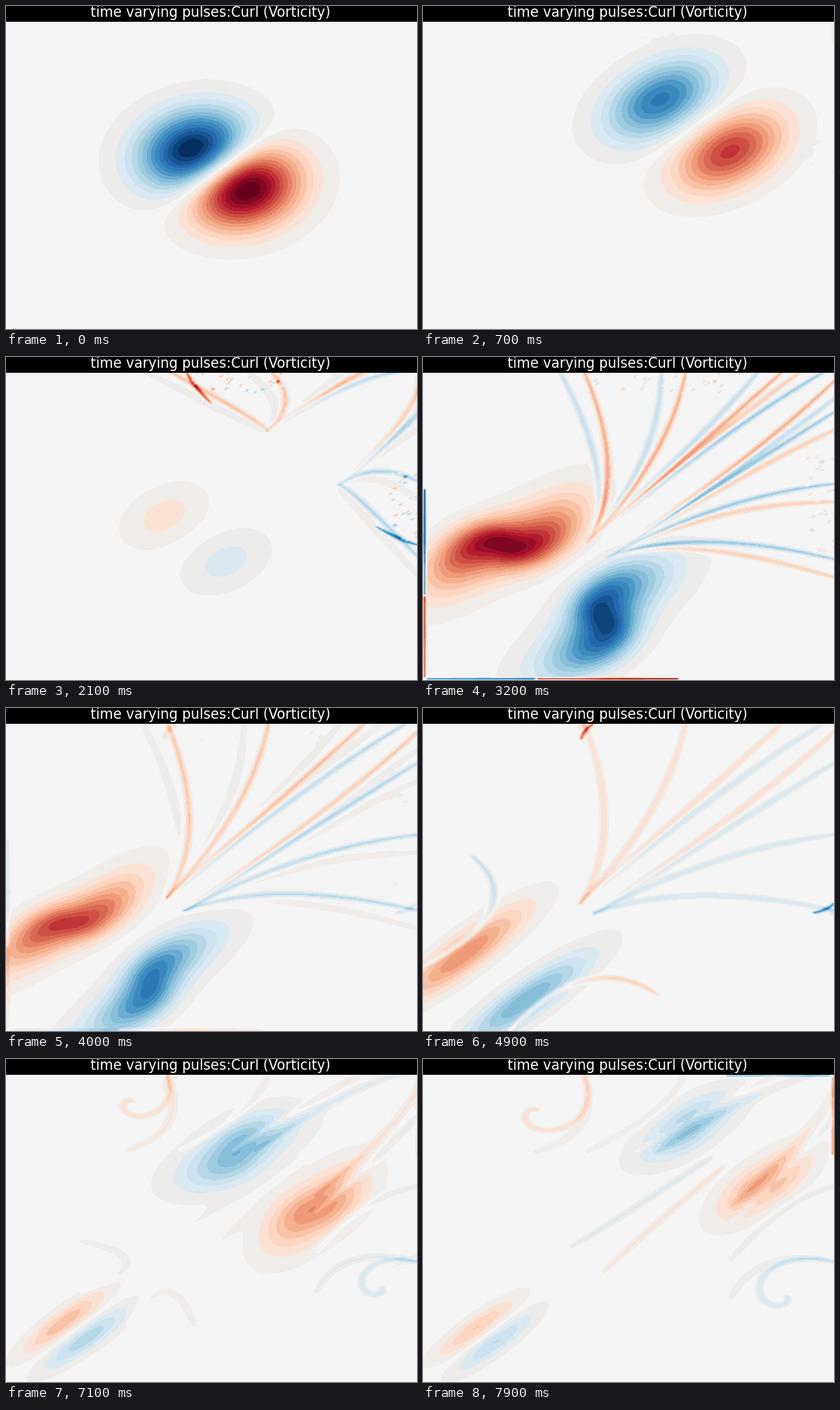
A matplotlib script that plays this animation: 496 px wide and 389 px high, repeating every 8 s.

```python
import numpy as np
import matplotlib.pyplot as plt
from matplotlib.animation import FuncAnimation

W, H, BAR = 496, 389, 19
FRAMES, STEP = 80, 100
BANDS = 14                       # colour bands on each side of zero
n = 248                          # grid of the unit square, b pointing up
axis = np.linspace(0, 1, n)
A, B = np.meshgrid(axis, axis)
rng = np.random.default_rng(4)
seeds = rng.uniform(-1, 1, (26, 2))


def hat(p):
    """Matrix of linear interpolation from the grid to positions p."""
    return np.maximum(0, 1 - np.abs(p[:, None] * (n - 1) - np.arange(n)))


COLS = hat((np.arange(W) + .5) / W)
ROWS = hat(1 - (np.arange(H - BAR) + .5) / (H - BAR))


def track(t, keys):
    """Row of values at time t; the first column of keys is time."""
    k = np.array(keys, float)
    return np.array([np.interp(t, k[:, 0], c) for c in k.T[1:]])


def bump(t, mid, width):
    return np.exp(-((t - mid) / width)**2)


# Vortices above the diagonal: time, strength, centre, length, width, tilt, swirl
FIRST = [(0, -17, .465, .573, .135, .12, .785, 0),
         (1.4, -2.7, .69, .92, .16, .07, .785, 0),
         (1.9, 0, .78, 1, .16, .06, .785, 0)]
BACK = [(1.8, 0, .40, .54, .10, .07, .8, 0),
        (2.1, 2, .385, .535, .11, .075, .8, 0),
        (3.2, 13.5, .20, .44, .19, .085, .85, 1.4),
        (4.9, 6.5, .10, .25, .2, .05, .8, 0),
        (6.4, 4.8, .15, .21, .14, .036, .82, 0),
        (7.9, 3.6, .13, .175, .13, .032, .78, 0)]
SECOND = [(5, 0, .465, .573, .135, .11, .785, 0),
          (6.4, -8, .49, .685, .165, .085, .45, -.8),
          (7.9, -5, .645, .83, .14, .06, .7, -.2)]


def vortex(t, keys):
    """Gaussian ellipse whose core is wound up relative to its rim."""
    amp, a, b, length, width, tilt, swirl = track(t, keys)
    if not amp:
        return 0
    x, y = A - a, B - b
    turn = tilt - swirl * np.exp(-np.hypot(x, y) / .12)
    c, s = np.cos(turn), np.sin(turn)
    return amp * np.exp(-((x * c + y * s) / length)**2 - ((y * c - x * s) / width)**2)


def ribbon(u, amp, w, path):
    """Add a tapered filament; it falls to half a band at distance w."""
    if abs(amp) < .3:
        return
    path = np.asarray(path, float)
    ws = w * (.5 + .5 * np.sqrt(np.sin(np.linspace(0, np.pi, len(path))).clip(0)))
    lo, hi = path.min(0) - 2.3 * w, path.max(0) + 2.3 * w
    sx = slice(*np.searchsorted(axis, (lo[0], hi[0])))
    sy = slice(*np.searchsorted(axis, (lo[1], hi[1])))
    x, y = axis[None, sx], axis[sy, None]
    near = np.full((y.size, x.size), 50.0)
    for p, q, w0, w1 in zip(path, path[1:], ws, ws[1:]):
        d = q - p
        f = np.clip(((x - p[0]) * d[0] + (y - p[1]) * d[1]) / (d @ d + 1e-9), 0, 1)
        r = (x - p[0] - f * d[0])**2 + (y - p[1] - f * d[1])**2
        np.minimum(near, r / (w0 + (w1 - w0) * f)**2, out=near)
    u[sy, sx] += amp * np.exp(-np.log(2 * max(abs(amp), .7)) * near)


def bezier(p, c, q, count=17):
    f = np.linspace(0, 1, count)[:, None]
    return (1 - f)**2 * np.array(p) + 2 * f * (1 - f) * np.array(c) + f**2 * np.array(q)


# Filaments run from a moving hub to fixed spots on the upper wall
FAN = [(.39, 1), (.64, 1), (.88, 1), (.985, -1)]
HUB = [(1.2, 0, .9, .97, 0), (2.1, 4, .635, .81, 0), (3.2, 5, .40, .45, 0),
       (4.9, 2.5, .383, .416, 0), (6.4, 2, .45, .76, .55), (7.9, 1.2, .4, .75, .5)]


def fan(u, t):
    amp, a, b, spread = track(t, HUB)
    ripple = bump(t, 2.9, .9)
    for end, sign in FAN:
        for e, k in ((end, 1), (end - .06, -.8 * ripple)):
            hub = np.array([a + spread * (e - .64), b])
            tip = np.array([e, 1.01])
            x = e - .38
            sag = (.11 - .1 * x, .27 * x - .07)
            ribbon(u, sign * k * amp, .012, bezier(hub, (hub + tip) / 2 + sag, tip))


def hook(u, t):
    """Filament rolling up into a log spiral below the upper wall."""
    g = (t - 4.8) / 3.1
    if g <= 0:
        return
    turn = np.linspace(0, 6, 30)
    r, ang = .17 * g * np.exp(-.5 * turn), .82 - turn
    x, y = .39 - .115 * g, 1 - .124 * g
    ribbon(u, 2.5, .011, np.c_[x + r * np.cos(ang), y + r * np.sin(ang)])


def curl(u, t):
    """Layer torn off the left wall by the returning pair."""
    p = track(t, [(4.2, 0, 0, .21, .15, .38, .05, .45), (4.9, -3, 0, .21, .27, .40, .12, .57),
                  (6.4, -2.4, .17, .29, .40, .40, .16, .47), (7.5, 0, .2, .3, .4, .4, .2, .45)])
    ribbon(u, p[0], .012, bezier(p[1:3], p[3:5], p[5:7]))


def walls(u, t):
    for mid, left in ((1.4, .93), (7.9, .74)):
        ribbon(u, -14 * bump(t, mid, .45), .007, [(left, .998), (.99, .998)])
    ribbon(u, -13 * bump(t, 3.2, .6), .007, [(.004, .28), (.004, .45), (.004, .62)])
    ribbon(u, 9 * bump(t, 3.2, .6), .006, [(.004, .01), (.004, .14), (.004, .27)])
    ribbon(u, 10 * bump(t, 5.3, 1.1), .009, bezier((.385, .95), (.39, .98), (.415, 1)))
    ribbon(u, 9 * bump(t, 2.1, .4), .009, bezier((.44, 1), (.46, .95), (.5, .9)))


def specks(u, t):
    amp = 7 * bump(t, 2.4, 1)
    for i, (p, q) in enumerate(seeds):
        x, y = .54 + (.03 + .05 * t) * p, .965 + .035 * q
        ribbon(u, amp * (-1)**i, .006, [(x, y), (x + .004, y + .006)])


def vorticity(t):
    u = np.zeros((n, n))
    for keys in (FIRST, BACK, SECOND):
        u += vortex(t, keys)
    for part in (fan, hook, curl, walls, specks):
        part(u, t)
    ribbon(u, -1.7 * bump(t, 7.9, .7), .011, bezier((.36, .44), (.5, .55), (.70, .73)))
    return u - u.T               # the flow is odd about the diagonal


palette = plt.get_cmap("RdBu_r")(np.linspace(0, 1, 2 * BANDS + 1), bytes=True)[:, :3].copy()
palette[BANDS] = 244, 244, 244
palette[[BANDS - 1, BANDS + 1]] = (237, 236, 235), (240, 236, 233)


def picture(t):
    u = ROWS @ vorticity(t) @ COLS.T
    return palette[np.clip(np.rint(u), -BANDS, BANDS).astype(int) + BANDS]


fig = plt.figure(figsize=(W / 100, H / 100), dpi=100, facecolor="black")
ax = fig.add_axes([0, 0, 1, (H - BAR) / H])
ax.axis("off")
im = ax.imshow(picture(0), interpolation="nearest", aspect="auto")
fig.text(247 / W, 1 - 13 / H, "time varying pulses:Curl (Vorticity)", color="white",
         family="DejaVu Sans", size=12, ha="center", va="baseline")


def draw(i):
    im.set_data(picture(i * STEP / 1000))
    return [im]


anim = FuncAnimation(fig, draw, frames=FRAMES, interval=STEP, repeat=True, repeat_delay=0)
plt.show()
```
